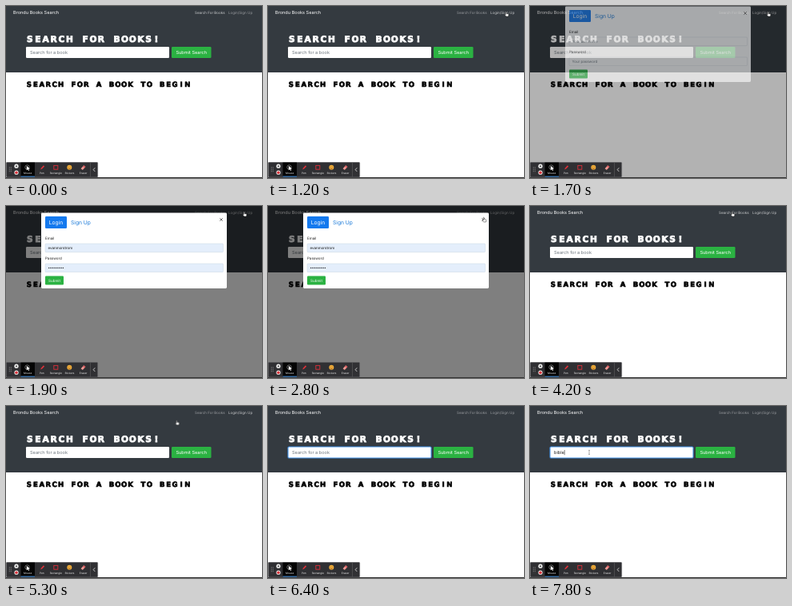
An HTML page that plays this animation: 320 by 215 pixels, repeating every 8000 ms.

```html
<!DOCTYPE html>
<html lang="en">
<head>
<meta charset="utf-8">
<title>Book search</title>
<style>
html, body { margin: 0; width: 100%; height: 100%; overflow: hidden; background: #fff; }
svg { display: block; width: 100vw; height: 100vh; }
text { font-family: Inter, Roboto, sans-serif; text-rendering: geometricPrecision; }
.mid { text-anchor: middle; }
.wide { font-family: "DejaVu Sans", sans-serif; font-weight: 700; text-anchor: middle; stroke-linejoin: miter; }
.lg { font-size: 5.6px; }
.sm { font-size: 4.5px; }
.tab { font-size: 6.7px; }
.tool { font-size: 3.2px; fill: #eee; text-anchor: middle; }
.hint { fill: #6c757d; }
.green { fill: #2bb242; }

.a { animation: 8s step-end -30ms infinite; }
.backdrop { animation-name: backdrop; }
.modal { animation-name: modal; }
.blank { animation-name: blank; }
.filled { animation-name: filled; }
.ring { animation-name: ring; }
.focus { animation-name: focus; }
.search-link { animation-name: search-link; }
.login-link { animation-name: login-link; }
.placeholder { animation-name: placeholder; }
.typed { animation-name: typed; }
.caret { animation-name: caret; }
.beam { animation-name: beam; }
.hand {
  animation: move 8s -30ms infinite, hand 8s step-end -30ms infinite;
}

@keyframes backdrop {
  0% { opacity: 0; }
  21.25% { opacity: .3; }
  22.5% { opacity: .5; }
  43.75% { opacity: .33; }
  45%, 100% { opacity: 0; }
}
@keyframes modal {
  0% { opacity: 0; transform: translateY(-14.4px); }
  21.25% { opacity: .6; transform: translateY(-8px); }
  22.5% { opacity: 1; transform: translateY(-2.7px); }
  23.75% { opacity: 1; transform: none; }
  43.75% { opacity: .65; transform: translateY(-4px); }
  45%, 100% { opacity: 0; transform: translateY(-14.4px); }
}
@keyframes blank { 0% { opacity: 1; } 23.75%, 100% { opacity: 0; } }
@keyframes filled { 0% { opacity: 0; } 23.75%, 100% { opacity: 1; } }
@keyframes ring { 0% { opacity: 0; } 42.5% { opacity: 1; } 45%, 100% { opacity: 0; } }
@keyframes focus { 0% { opacity: 0; } 75%, 100% { opacity: 1; } }
@keyframes search-link {
  0% { opacity: .75; }
  10% { opacity: .5; }
  51.25% { opacity: .75; }
  65%, 100% { opacity: .5; }
}
@keyframes login-link {
  0% { opacity: .5; }
  11.25% { opacity: .75; }
  75%, 100% { opacity: .5; }
}
@keyframes placeholder { 0% { opacity: 1; } 88.75%, 100% { opacity: 0; } }
@keyframes typed {
  0% { clip-path: inset(0 100% 0 0); }
  88.75% { clip-path: inset(0 73% 0 0); }
  91.25% { clip-path: inset(0 63% 0 0); }
  92.5% { clip-path: inset(0 36% 0 0); }
  95% { clip-path: inset(0 26% 0 0); }
  96.25%, 100% { clip-path: inset(0); }
}
@keyframes caret {
  0% { opacity: 0; transform: none; }
  88.75% { opacity: 1; transform: translateX(3.5px); }
  91.25% { opacity: 1; transform: translateX(4.9px); }
  92.5% { opacity: 1; transform: translateX(8.3px); }
  95% { opacity: 1; transform: translateX(9.6px); }
  96.25%, 100% { opacity: 1; transform: translateX(13px); }
}
@keyframes beam { 0% { opacity: 0; } 95%, 100% { opacity: 1; } }
@keyframes hand { 0% { opacity: 0; } 3.75% { opacity: 1; } 75%, 100% { opacity: 0; } }
@keyframes move {
  0%, 3.75% { transform: translate(262px, 10px); animation-timing-function: steps(6); }
  11.25%, 26.25% { transform: translate(296px, 7px); animation-timing-function: steps(6); }
  33.75%, 45% { transform: translate(268px, 14px); animation-timing-function: steps(6); }
  52.5%, 63.75% { transform: translate(251px, 7px); animation-timing-function: steps(9); }
  75%, 100% { transform: translate(74px, 55px); }
}
</style>
</head>
<body>
<svg viewBox="0 0 320 215" preserveAspectRatio="none">
  <rect width="320" height="215" fill="#fff"/>
  <rect width="320" height="83" fill="#343a40"/>

  <text class="lg" x="9" y="10.3" fill="#fff">Brondu Books Search</text>
  <text class="sm a search-link" x="236" y="10" fill="#fff">Search For Books</text>
  <text class="sm a login-link" x="278" y="10" fill="#fff">Login/Sign Up</text>

  <text class="wide" data-left="25" data-step="9.88" y="45" font-size="10.6" fill="#fff" stroke="#fff" stroke-width=".8">SEARCH FOR BOOKS!</text>
  <text class="wide" data-left="25" data-step="7.92" y="101.4" font-size="8.6" fill="#000" stroke="#000" stroke-width=".65">SEARCH FOR A BOOK TO BEGIN</text>

  <rect x="25" y="51" width="179" height="14" rx="1.3" fill="#fff"/>
  <rect class="a focus" x="25" y="51" width="179" height="14" rx="1.3" fill="none" stroke="#3f8fe6" stroke-width="1.1"/>
  <text class="lg hint a placeholder" x="30" y="60">Search for a book</text>
  <text class="lg a typed" x="30" y="60" fill="#222">bible</text>
  <rect class="a caret" x="29.8" y="55" width=".6" height="6.2" fill="#222"/>
  <path class="a beam" d="M73 55.4h2M74 55.4v5M73 60.4h2" fill="none" stroke="#777" stroke-width=".6"/>

  <rect class="green" x="207" y="51" width="49.5" height="14" rx="1.3"/>
  <text class="lg mid" x="231.7" y="60" fill="#fff">Submit Search</text>

  <rect class="a backdrop" width="320" height="215" fill="#000"/>

  <g class="a modal">
    <rect x="44" y="8.5" width="232" height="94.5" rx="1.4" fill="#fff"/>
    <rect x="49" y="13" width="27" height="15" rx="1.2" fill="#1479ee"/>
    <text class="tab mid" x="62.5" y="22.8" fill="#fff">Login</text>
    <text class="tab" x="81" y="22.8" fill="#1878d8">Sign Up</text>
    <path d="M267.4 15.3l3.4 3.4m0-3.4l-3.4 3.4" stroke="#555" stroke-width=".9"/>

    <g class="sm" fill="#222">
      <text x="49" y="42.3">Email</text>
      <text x="49" y="67.4">Password</text>
    </g>
    <g class="sm a blank">
      <g fill="#fff" stroke="#ced4da" stroke-width=".4">
        <rect x="49" y="47" width="222.5" height="10.7" rx="1"/>
        <rect x="49" y="72" width="222.5" height="10.7" rx="1"/>
      </g>
      <g class="hint">
        <text x="52.5" y="54">Your username</text>
        <text x="52.5" y="79">Your password</text>
      </g>
    </g>
    <g class="sm a filled">
      <g fill="#e4eefb" stroke="#c3d0dc" stroke-width=".4">
        <rect x="49" y="47" width="222.5" height="10.7" rx="1"/>
        <rect x="49" y="72" width="222.5" height="10.7" rx="1"/>
      </g>
      <text x="52.5" y="54" fill="#111">evanmorstrom</text>
      <path d="M53.5 77.4h18.2" stroke="#222" stroke-width="1.2" stroke-linecap="round" stroke-dasharray="0 1.8"/>
    </g>

    <rect class="green" x="49" y="87.5" width="23" height="11" rx="1.1"/>
    <text class="sm mid" x="60.5" y="94.7" fill="#fff">Submit</text>
  </g>

  <circle class="a ring" cx="269" cy="16.8" r="3.8" fill="none" stroke="#85585a" stroke-width=".8"/>

  <rect y="214" width="320" height="1" fill="#333"/>

  <!-- recorder toolbar -->
  <rect x=".3" y="195.3" width="114.4" height="18.6" rx="1.2" fill="#303033" stroke="#77777a" stroke-width=".5"/>
  <g fill="none" stroke="#aaa" stroke-width=".9" stroke-dasharray=".9 1.3">
    <path d="M4.3 201.5v6.8M6.3 201.5v6.8"/>
  </g>
  <circle cx="13" cy="200.2" r="2.6" fill="#eee"/>
  <circle cx="13" cy="200.2" r="1" fill="#444"/>
  <circle cx="13" cy="208.2" r="2.6" fill="#eee"/>
  <circle cx="13" cy="208.2" r="1.8" fill="#d9343c"/>
  <rect x="18.5" y="195.6" width="17.5" height="18" fill="#050505"/>
  <rect x="18.5" y="212.6" width="17.5" height="1.2" fill="#3d7fc4"/>
  <circle cx="26.5" cy="201.5" r="2.7" fill="none" stroke="#aaa" stroke-width=".6"/>
  <path d="M25.8 199.8l4.2 3.6-1.9.2 1 2-.9.4-.9-2-1.5 1.2z" fill="#fff"/>
  <path d="M43.2 204.5l.7-2 3-3.2 1.2 1.1-3 3.2z" fill="#e0323a"/>
  <rect x="59.8" y="199.4" width="5" height="4.8" fill="none" stroke="#d9303a" stroke-width=".9"/>
  <circle cx="79.3" cy="201.8" r="3" fill="#f3b13c"/>
  <path d="M78.2 200.5v.9M80.4 200.5v.9M77.7 202.8q1.6 1.5 3.2 0" fill="none" stroke="#7a3a10" stroke-width=".6"/>
  <path d="M93.6 203.2l3.6-4 2.2 1.8-3.6 4z" fill="#ef9a94"/>
  <path d="M96 200.5l1.2-1.3 2.2 1.8-1.2 1.3z" fill="#d5545a"/>
  <g class="tool">
    <text x="27.2" y="210.2">Mouse</text>
    <text x="44.8" y="210.2">Pen</text>
    <text x="62.3" y="210.2">Rectangle</text>
    <text x="79.5" y="210.2">Stickers</text>
    <text x="96.7" y="210.2">Eraser</text>
  </g>
  <path d="M105.5 196v17.5" stroke="#666" stroke-width=".5"/>
  <path d="M111.2 202.3l-2 2.3 2 2.3" fill="none" stroke="#eee" stroke-width=".8"/>

  <g class="hand">
    <path d="M1.2.4q.6-.5 1 .2v1.9l2.2.5q.6.3.5 1l-.5 2h-2.8L0 3.9q0-.7.9-.4l.3.3z" fill="#fff" stroke="#111" stroke-width=".45"/>
  </g>
</svg>
<script>
// Set the headings on an even, monospaced grid.
for (const el of document.querySelectorAll('[data-step]')) {
  const { left, step } = el.dataset;
  const xs = [...el.textContent].map((_, i) => (+left + (i + 0.5) * step).toFixed(2));
  el.setAttribute('x', xs.join(' '));
}
</script>
</body>
</html>
```
